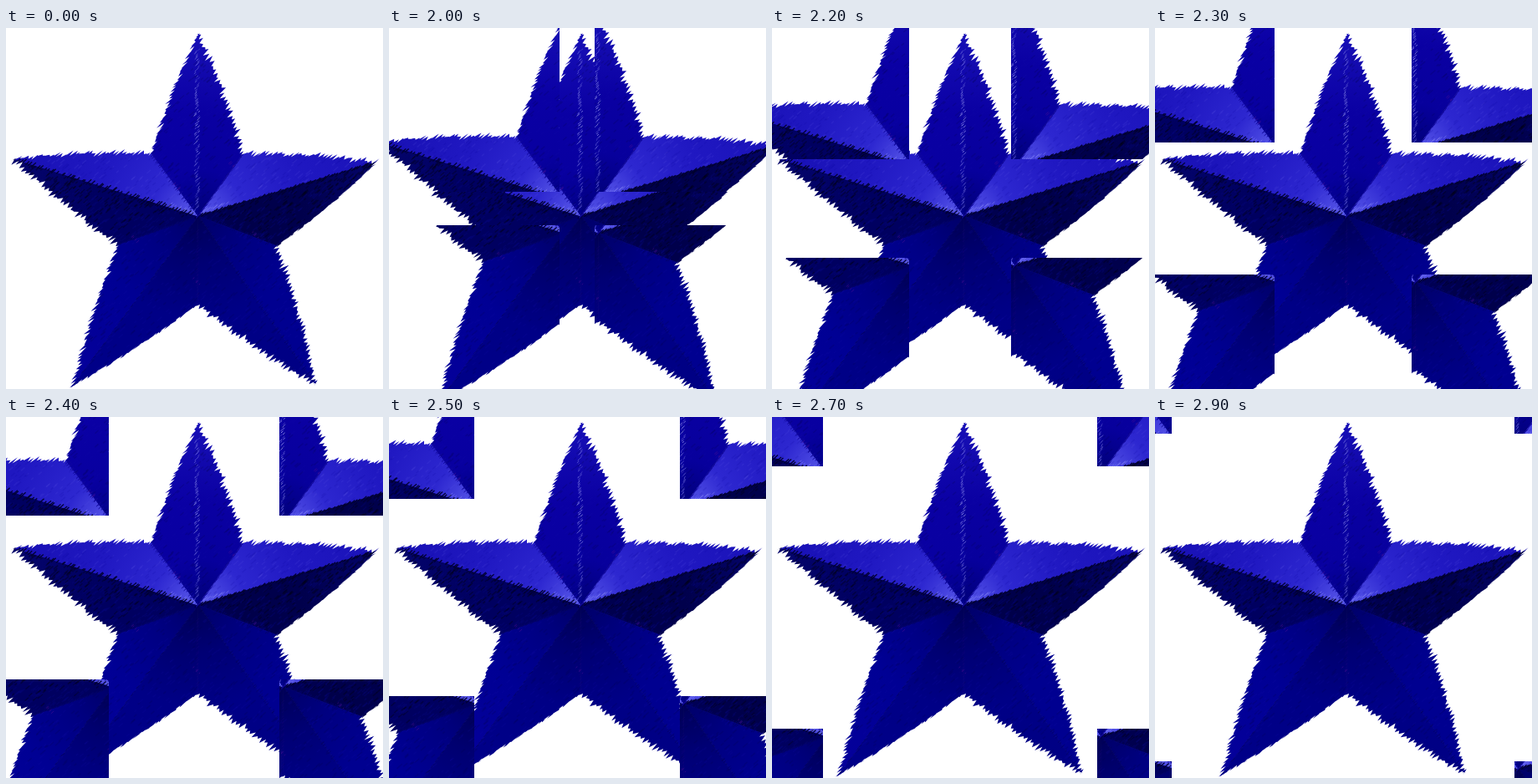
An HTML page with a canvas that plays this animation: 451x432 px, repeating every 3000 ms.

```html
<!DOCTYPE html>
<html lang="en">
<head>
<meta charset="utf-8">
<title>Blue star</title>
<style>
html, body { margin: 0; width: 100%; height: 100%; overflow: hidden; background: #fff; }
canvas { display: block; }
</style>
</head>
<body>
<canvas id="stage" width="451" height="432"></canvas>
<script>
const W = 451, H = 432, MX = 225, MY = 216;
const C = [230, 225];
// Outline clockwise from the top tip
const V = [[230, 7], [284, 150], [444, 160], [324, 261], [371, 427],
           [229, 331], [80, 428], [134, 259], [8, 156], [174, 150]];
// One facet per outline edge: colours from centre to tip
const FACETS = [
  ['#000078', '#07009c', '#0a00a2', '#1a12b8'],
  ['#5c5cec', '#2d27d0', '#2018c2', '#1a12b8'],
  ['#000058', '#00004a', '#00004c', '#04046c'],
  ['#000068', '#000080', '#000090', '#000090'],
  ['#000058', '#000074', '#000086', '#000084'],
  ['#000054', '#000070', '#000086', '#000088'],
  ['#000068', '#000082', '#000094', '#04009a'],
  ['#00005c', '#000060', '#000060', '#04046c'],
  ['#5c5cec', '#2d27d0', '#2018c2', '#1810b4'],
  ['#000084', '#0800a0', '#0a00a4', '#1810b8']
];

let seed = 11;
const rand = () => (seed = (seed * 16807) % 2147483647) / 2147483647;
const mix = (a, b, t) => [a[0] + (b[0] - a[0]) * t, a[1] + (b[1] - a[1]) * t];

function slash(g, [x, y], len, color, width = 1) {
  g.strokeStyle = color;
  g.lineWidth = width;
  g.beginPath();
  g.moveTo(x - len * .4, y + len * .35);
  g.lineTo(x + len * .4, y - len * .35);
  g.stroke();
}

function fray(g, a, b, count, len, color, width) {
  for (let i = 0; i < count; i++) {
    slash(g, mix(a, b, (i + rand()) / count), len * (.5 + rand()), color, width);
  }
}

// Slightly bulging star outline, broken into uneven slanted teeth
function raggedOutline() {
  const path = new Path2D();
  V.forEach((a, i) => {
    const b = V[(i + 1) % V.length];
    const len = Math.hypot(b[0] - a[0], b[1] - a[1]);
    const nx = (b[1] - a[1]) / len, ny = (a[0] - b[0]) / len;
    const n = 2 * Math.round(len / 5);
    for (let k = 0; k < n; k++) {
      const t = (k + rand() * .7) / n;
      const [x, y] = mix(a, b, t);
      const out = 3 * Math.sin(Math.PI * t) + (rand() - .5) * 2;
      const d = (k % 2 ? 1 : -1) * (.4 + 4.6 * rand() ** 1.5);
      path.lineTo(x + nx * out + d, y + ny * out - d * .8);
    }
  });
  path.closePath();
  return path;
}

function paintStar() {
  const cv = document.createElement('canvas');
  cv.width = W;
  cv.height = H;
  const g = cv.getContext('2d');
  g.fillStyle = '#fff';
  g.fillRect(0, 0, W, H);
  g.clip(raggedOutline());

  FACETS.forEach((colors, i) => {
    const a = V[i], b = V[(i + 1) % V.length];
    const fill = g.createRadialGradient(...C, 0, ...C, 225);
    [0, .25, .55, 1].forEach((t, k) => fill.addColorStop(t, colors[k]));
    g.fillStyle = g.strokeStyle = fill;
    g.lineWidth = 1;
    g.beginPath();
    g.moveTo(...C);
    g.lineTo(...mix(C, a, 1.25));
    g.lineTo(...mix(C, b, 1.25));
    g.closePath();
    g.fill();
    g.stroke();

    const bright = i === 1 || i === 8, dark = i === 2 || i === 7;
    for (let k = 0; k < (dark ? 300 : 110); k++) {
      const s = rand();
      const p = mix(C, mix(a, b, s), Math.sqrt(rand()));
      // Dark facets are blackest along their upper ridge
      const light = rand() < (dark ? (i === 7 ? 1 - s : s) : .5);
      const tint = bright ? (light ? '#5a54e028' : '#1008a028')
        : dark ? (light ? '#08088048' : '#00001868')
        : (light ? '#1810a826' : '#00004830');
      slash(g, p, 3 + rand() * 5, tint, 1.5);
    }
  });

  // Facet ridges
  fray(g, C, V[2], 55, 6, '#000034', 1.3);
  fray(g, C, V[8], 55, 6, '#000034', 1.3);
  fray(g, C, V[4], 60, 4, '#00005070');
  fray(g, C, V[6], 60, 4, '#00005070');
  fray(g, C, V[3], 26, 5, '#00006c');
  fray(g, C, V[7], 26, 5, '#00006c');
  fray(g, [229, 240], V[5], 26, 4, '#18008066');
  fray(g, V[9], C, 30, 5, '#10089c');
  fray(g, V[1], C, 30, 5, '#10089c');

  // Glints beside the centre
  fray(g, [196, 211], [227, 221], 10, 5, '#7878f0aa');
  fray(g, [234, 219], [266, 209], 10, 5, '#7878f0aa');

  // Pale seam down the top arm
  for (let y = 26; y < 218; y += 2) {
    const strength = y > 70 && y < 150 ? 1 : .7;
    slash(g, [228.5 + (rand() - .5) * 5, y], 1.5 + rand() * 3,
      `rgba(135,135,230,${strength * (.4 + rand() * .6)})`);
  }

  // Violet flecks
  [[205, 190], [270, 163], [154, 252], [228, 303], [298, 247]].forEach(([x, y]) =>
    fray(g, [x - 4, y - 4], [x + 4, y + 4], 4, 3, '#50109488'));
  return cv;
}

const star = paintStar();
const ctx = document.getElementById('stage').getContext('2d');

// Copies a rectangle of the star, moved by (dx, dy)
function piece(x, y, w, h, dx, dy) {
  ctx.drawImage(star, x, y, w, h, x + dx, y + dy, w, h);
}

function frame(now) {
  const t = now % 3000;
  ctx.drawImage(star, 0, 0);
  if (t >= 2000) {
    // Four quarters slide out to the corners in ten steps
    const k = Math.floor((t - 2000) / 100) + 1;
    const ox = Math.round(MX * k / 11 + .1), oy = Math.round(MY * k / 11);
    const lw = MX - ox, rw = W - MX - ox, h = MY - oy;
    piece(ox, oy, lw, h, -ox, -oy);
    piece(MX, oy, rw, h, ox, -oy);
    piece(ox, MY, lw, h, -ox, oy);
    piece(MX, MY, rw, h, ox, oy);
  }
  requestAnimationFrame(frame);
}
requestAnimationFrame(frame);
</script>
</body>
</html>
```
